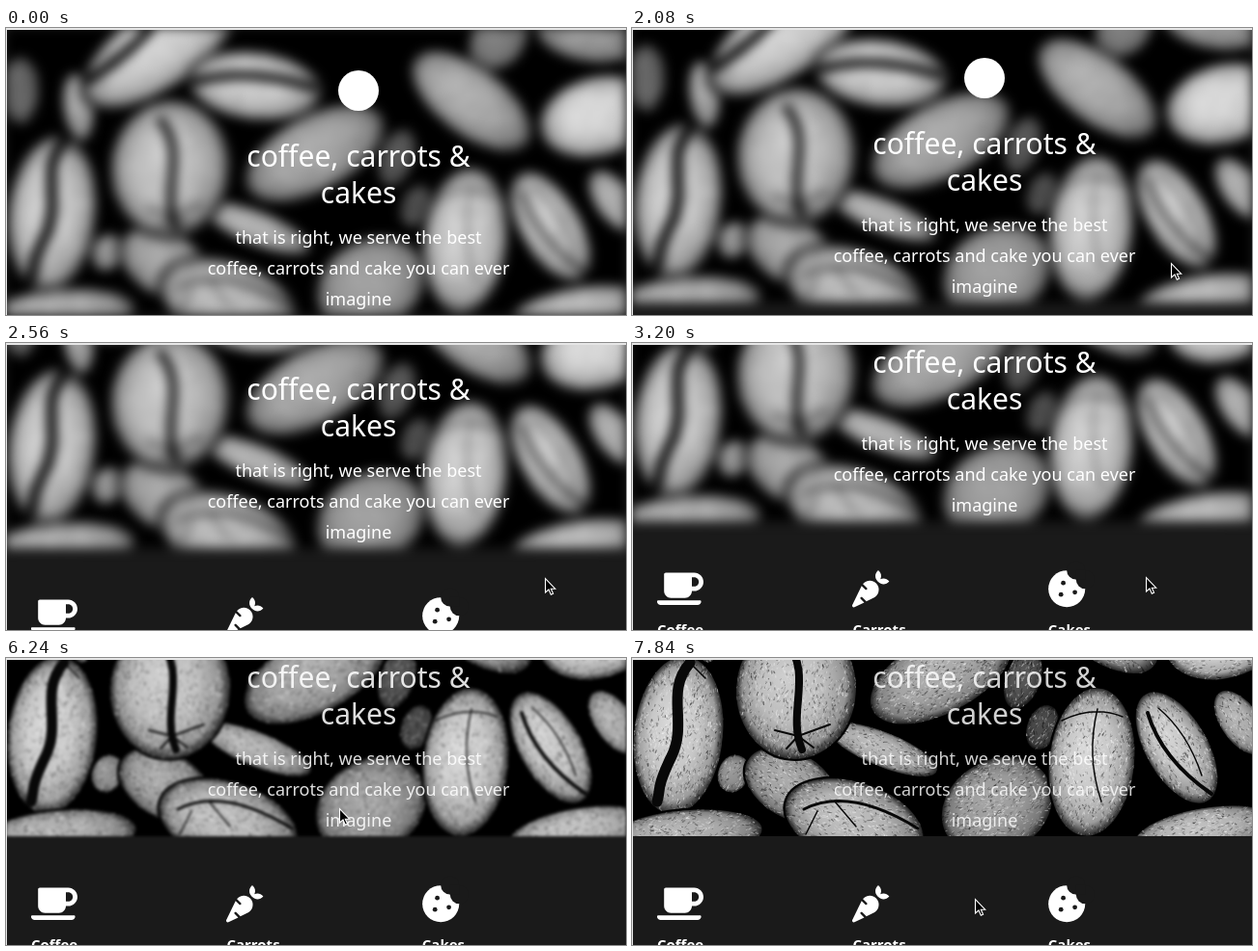
These frames come from a looping animation (642x298 px, 8 s). An HTML page with a canvas:

```html
<!DOCTYPE html>
<html lang="en">
<head>
<meta charset="utf-8">
<title>coffee, carrots &amp; cakes</title>
<style>
html, body { margin: 0; width: 100%; height: 100%; overflow: hidden; background: #1a1a1a; }
canvas { display: block; }
</style>
</head>
<body>
<canvas id="stage" width="642" height="298"></canvas>
<script>
const W = 642, H = 298, LOOP = 8000, STEP = 160;
const HERO_H = 298, MAX_BLUR = 6, DARK = '#1a1a1a';
const FONT = '"Noto Sans", "Open Sans", sans-serif';
const ctx = document.getElementById('stage').getContext('2d');

// x, y, half width, half length, tilt in degrees, brightness
const beans = [
  [15, 65, 20, 36, 0, 95], [425, 185, 16, 24, 20, 70], [405, 135, 18, 32, 20, 80],
  [75, 82, 16, 36, -8, 160], [510, 12, 28, 36, 40, 120], [603, 8, 28, 56, 100, 145],
  [160, 20, 42, 95, 55, 200], [258, 60, 36, 70, 97, 195], [320, 130, 40, 80, 62, 160],
  [482, 76, 36, 74, -53, 165], [613, 92, 42, 62, 75, 205], [105, 233, 16, 20, 20, 140],
  [165, 245, 34, 52, -60, 155], [260, 208, 18, 60, -68, 170], [170, 146, 62, 72, 4, 185],
  [48, 193, 46, 82, 6, 195], [55, 297, 26, 80, 85, 165], [378, 267, 48, 60, 60, 150],
  [230, 284, 42, 74, -72, 175], [476, 221, 44, 77, 6, 195], [564, 206, 32, 64, -30, 190],
  [630, 180, 20, 38, -35, 165], [592, 293, 24, 72, 80, 175]
];
const creases = [
  [11, 'M60 118C34 148 58 180 41 215S30 250 26 262'],
  [8, 'M160 96C188 130 160 170 176 208'],
  [10, 'M150 0Q130 24 85 55'],
  [9, 'M195 56Q250 40 318 62'],
  [4, 'M534 170Q548 218 600 254'],
  [3, 'M178 270Q225 246 296 290'],
  [2, 'M148 188L172 194L205 182M172 194L160 207M172 194L188 206M172 194V166'],
  [1.5, 'M445 178Q478 162 508 174M482 166Q470 215 486 262M62 120L76 134'],
  [1.5, 'M192 272L180 296M210 262L232 288M545 165Q575 190 590 235']
];

const gray = v => { v = Math.min(255, Math.round(v)); return `rgb(${v},${v},${v})`; };

function randomizer(seed) {
  return () => {
    seed = (seed * 1664525 + 1013904223) >>> 0;
    return seed / 4294967296;
  };
}

function drawBean(g, rnd, [x, y, a, b, deg, light]) {
  const angle = deg * Math.PI / 180;
  g.save();
  g.translate(x, y);
  g.rotate(angle);
  g.beginPath();
  g.ellipse(0, 0, a, b, 0, 0, 7);
  g.lineWidth = 4;
  g.strokeStyle = '#000';
  g.stroke();
  g.clip();
  g.save();
  g.scale(a, b);
  // keep the highlight at the upper left whatever the tilt
  const dx = -.2 * (Math.cos(angle) + Math.sin(angle));
  const dy = -.2 * (Math.cos(angle) - Math.sin(angle));
  const shade = g.createRadialGradient(dx, dy, 0, 0, 0, 1);
  [[0, 1.12], [.55, 1.02], [.86, .8], [1, .2]].forEach(([p, k]) => shade.addColorStop(p, gray(light * k)));
  g.fillStyle = shade;
  g.fillRect(-1, -1, 2, 2);
  g.restore();
  for (let i = a * b / 2.6; i > 0; i--) {
    const px = (rnd() * 2 - 1) * a, py = (rnd() * 2 - 1) * b;
    g.strokeStyle = rnd() < .5 ? '#fff' : '#000';
    g.globalAlpha = .12 + rnd() * .38;
    g.lineWidth = .5 + rnd() * .8;
    g.beginPath();
    g.moveTo(px, py);
    g.lineTo(px + rnd() * 4 - 2, py + 1 + rnd() * 3);
    g.stroke();
  }
  g.restore();
}

function makePhoto() {
  const photo = document.createElement('canvas');
  photo.width = W;
  photo.height = HERO_H;
  const g = photo.getContext('2d'), rnd = randomizer(41);
  g.fillStyle = '#000';
  g.fillRect(0, 0, W, HERO_H);
  beans.forEach(bean => drawBean(g, rnd, bean));
  g.strokeStyle = '#080808';
  g.lineCap = g.lineJoin = 'round';
  creases.forEach(([width, d]) => {
    g.lineWidth = width;
    g.stroke(new Path2D(d));
  });
  return photo;
}
const photo = makePhoto();

const cup = new Path2D('M192 384h192c53 0 96-43 96-96h32c70.6 0 128-57.4 128-128S582.6 32 512 32H120c-13.3 0-24 10.7-24 24v232c0 53 43 96 96 96zM512 96c35.3 0 64 28.7 64 64s-28.7 64-64 64h-32V96zM559.7 480H48.3c-47.6 0-61-64-36-64h583.3c25 0 11.8 64-35.9 64z');
const carrot = new Path2D('M298 157c-53-26-114-11-150 32l55 55c6 6 6 17 0 23s-16 6-22 0l-51-50L2 480c-3 6-3 13 0 19 6 11 19 16 30 11l134-65-49-49c-7-7-7-17 0-23s16-6 22 0l57 57 102-50c24-12 45-31 57-57 30-62 5-136-57-166zM390 122C410 81 400 33 360 0c-50 42-52 107-8 152l8 8c44 45 110 42 152-8-33-40-81-50-122-30z');
const arrow = new Path2D('M.5 .5V15L4 12L6.3 17.3L8.6 16.3L6.3 11.2H10.7Z');

function disc(x, y, r, color) {
  ctx.fillStyle = color;
  ctx.beginPath();
  ctx.arc(x, y, r, 0, 7);
  ctx.fill();
}

function drawIcon(x, y, paint) {
  ctx.save();
  ctx.translate(x, y);
  ctx.scale(.075, .075);
  ctx.fillStyle = '#fff';
  paint();
  ctx.restore();
}

function paintCookie() {
  disc(256, 256, 254, '#fff');
  disc(512, 128, 128, DARK);
  disc(384, 0, 128, DARK);
  ctx.fillRect(384, -5, 135, 133);
  [[176, 336], [208, 176], [368, 304]].forEach(([x, y]) => disc(x, y, 32, DARK));
}

// Pointer tip and scroll offset, each held until the next entry
const pointer = [
  [160, 450, 261], [320, 433, 227],
  [1760, 455, 226], [1920, 520, 237], [2080, 558, 244],
  [3200, 532, 243], [3360, 518, 232], [3520, 524, 238], [3680, 530, 242],
  [4320, 490, 236], [4480, 420, 227], [4640, 376, 223], [4800, 363, 222],
  [5120, 358, 217], [5280, 349, 208], [5440, 344, 180], [5600, 345, 156],
  [7200, 346, 170], [7360, 349, 198], [7520, 352, 224], [7680, 354, 242], [7840, 355, 250]
];
const scrolling = [[0, 0], [640, 7], [800, 13], [2400, 40], [2560, 85], [2720, 106], [2880, 113]];
const held = (track, t) => track.filter(entry => entry[0] <= t).pop();

// CSS "ease" curve, solved by bisection
function ease(p) {
  if (p <= 0 || p >= 1) return p <= 0 ? 0 : 1;
  const bez = (s, p1, p2) => 3 * (1 - s) ** 2 * s * p1 + 3 * (1 - s) * s * s * p2 + s ** 3;
  let lo = 0, hi = 1;
  for (let i = 0; i < 20; i++) {
    const mid = (lo + hi) / 2;
    if (bez(mid, .25, .25) < p) lo = mid; else hi = mid;
  }
  return bez(lo, .1, 1);
}

function drawPage(focus) {
  ctx.save();
  ctx.filter = focus < 1 ? `blur(${MAX_BLUR * (1 - focus)}px)` : 'none';
  ctx.drawImage(photo, 0, 0);
  ctx.restore();

  ctx.save();
  ctx.globalAlpha = 1 - .18 * focus;
  disc(365, 65, 21, '#fff');
  ctx.textAlign = 'center';
  ctx.font = '30px ' + FONT;
  ctx.fillText('coffee, carrots &', 365, 144);
  ctx.fillText('cakes', 365, 182);
  ctx.font = '18px ' + FONT;
  ['that is right, we serve the best', 'coffee, carrots and cake you can ever', 'imagine']
    .forEach((line, i) => ctx.fillText(line, 365, 224 + i * 32));
  ctx.restore();

  drawIcon(26, 349, () => ctx.fill(cup, 'evenodd'));
  drawIcon(228, 349, () => ctx.fill(carrot));
  drawIcon(431, 349, paintCookie);
  ctx.fillStyle = '#fff';
  ctx.font = 'bold 15px ' + FONT;
  ['Coffee', 'Carrots', 'Cakes'].forEach((label, i) => ctx.fillText(label, 26 + i * 202.4, 416));
}

function drawPointer([, x, y]) {
  ctx.save();
  ctx.translate(x, y);
  ctx.fillStyle = '#000';
  ctx.strokeStyle = '#fff';
  ctx.lineWidth = 1.1;
  ctx.fill(arrow);
  ctx.stroke(arrow);
  ctx.restore();
}

function render(time) {
  const t = Math.floor(time % LOOP / STEP) * STEP;
  ctx.fillStyle = DARK;
  ctx.fillRect(0, 0, W, H);
  ctx.save();
  ctx.translate(0, -held(scrolling, t)[1]);
  drawPage(ease((t - 5810) / 1000));
  ctx.restore();
  const tip = held(pointer, t);
  if (tip) drawPointer(tip);
  ctx.fillStyle = '#e6e6e6';
  ctx.fillRect(0, 0, W, 2);
  ctx.fillRect(0, 0, 1, H);
}

let start;
function tick(now) {
  start ??= now;
  render(Math.max(0, now - start));
  requestAnimationFrame(tick);
}
render(0);
requestAnimationFrame(tick);
</script>
</body>
</html>
```
